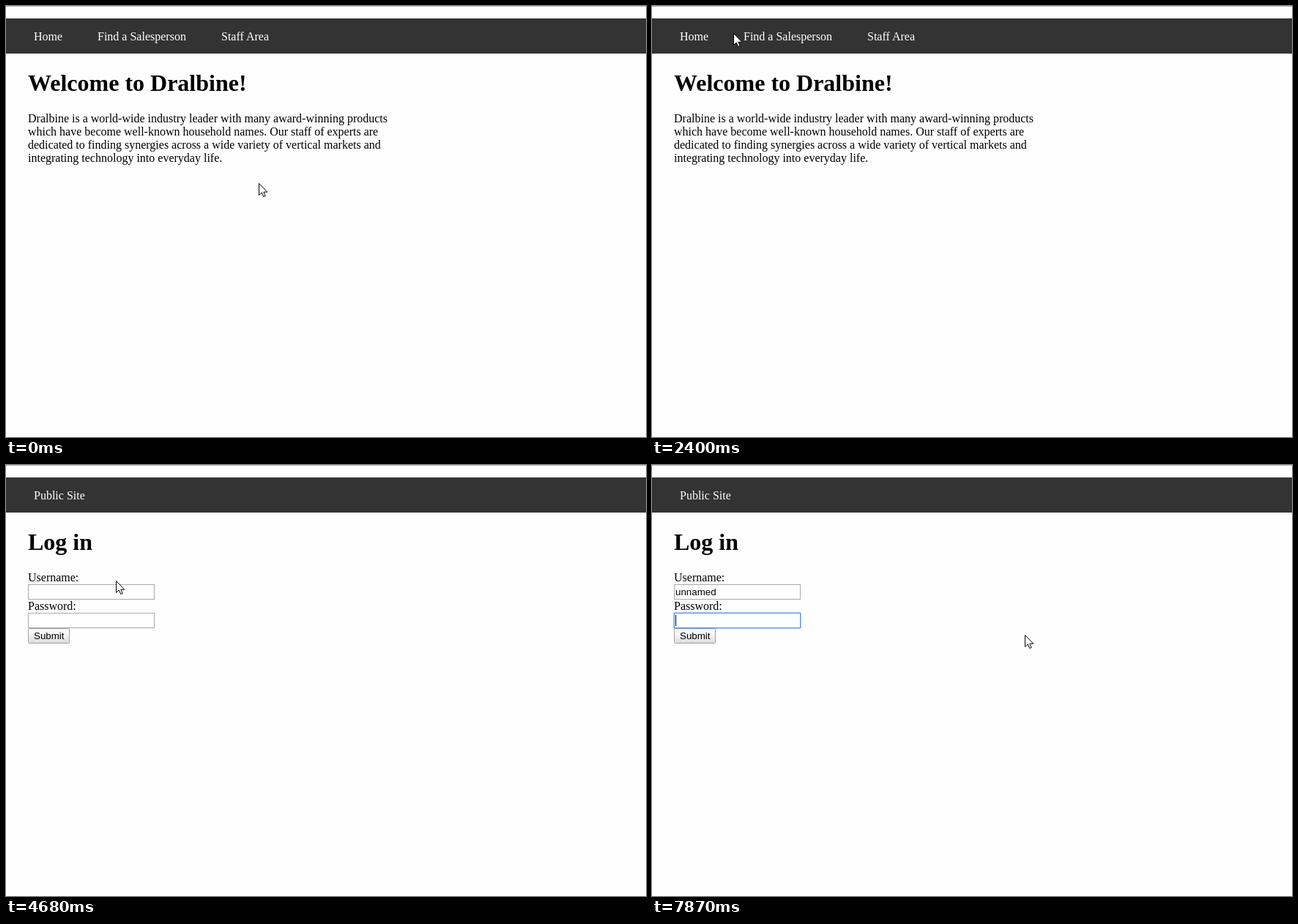
Animation, 874 px wide and 589 px high, one loop 8000 ms. Source, as an HTML page:

```html
<!DOCTYPE html>
<html lang="en">
<head>
<meta charset="utf-8">
<title>Log in</title>
<style>
  html, body { margin: 0; width: 100%; height: 100%; overflow: hidden; background: #fefefe; }
  svg { display: block; }
  text { font: 16px "Liberation Serif", "Times New Roman", serif; white-space: pre; }
  .nav text { fill: #fff; }
  .title { font-size: 32px; font-weight: bold; }
  .ui { font: 13.333px "Liberation Sans", Arial, sans-serif; }
  .field { fill: #fff; stroke: #a9a9a9; }
  .ring { fill: none; stroke: #5b92e5; }
  .ring .glow { stroke-opacity: .45; }
  .outlined { fill: #fff; stroke: #000; stroke-linejoin: round; }
</style>
</head>
<body>
<svg width="874" height="589" viewBox="0 0 874 589">
  <rect width="874" height="589" fill="#fefefe"/>
  <rect width="874" height="1" fill="#b4b4b4"/>
  <rect y="17" width="874" height="48" fill="#333"/>

  <g id="home">
    <g class="nav">
      <text x="38" y="47">Home</text>
      <text x="125" y="47">Find a Salesperson</text>
      <text x="294" y="47">Staff Area</text>
    </g>
    <text class="title" x="30" y="116">Welcome to Dralbine!</text>
    <text x="30" y="159">Dralbine is a world-wide industry leader with many award-winning products</text>
    <text x="30" y="177">which have become well-known household names. Our staff of experts are</text>
    <text x="30" y="195">dedicated to finding synergies across a wide variety of vertical markets and</text>
    <text x="30" y="213">integrating technology into everyday life.</text>
  </g>

  <g id="login">
    <g class="nav"><text x="38" y="47">Public Site</text></g>
    <text class="title" x="30" y="116">Log in</text>
    <text x="30" y="159">Username:</text>
    <rect class="field" x="30.5" y="163.5" width="172" height="20"/>
    <text x="30" y="198">Password:</text>
    <rect class="field" x="30.5" y="202.5" width="172" height="20"/>
    <linearGradient id="face" x2="0" y2="1">
      <stop offset=".35" stop-color="#f6f6f6"/>
      <stop offset="1" stop-color="#dcdcdc"/>
    </linearGradient>
    <rect x="30.5" y="223.5" width="56" height="20" rx="1" fill="url(#face)" stroke="#a0a0a0"/>
    <text class="ui" x="38" y="238">Submit</text>
    <text class="ui" id="user" x="32" y="178"></text>
    <g id="focus">
      <g class="ring">
        <rect class="glow" x="29.5" y="162.5" width="174" height="22" rx="1.5"/>
        <rect x="30.5" y="163.5" width="172" height="20"/>
      </g>
      <rect id="caret" y="166" width="1" height="15"/>
    </g>
  </g>

  <g id="cursor">
    <path id="arrow" class="outlined" d="M.5 .5V16.5L4.2 13L6.8 18.5L9.2 17.5L6.8 12.2H11.8Z"/>
    <g id="hand">
      <path class="outlined" d="M-1.5 12V2Q-1.5 .5 0 .5T1.5 2V7Q4 5.6 4.8 7.6Q7 6.6 7.6 8.6
        Q10.5 8 10.5 10.5V15Q10.5 17.5 8.5 19V21.5H-1.5V19.5Q-4 16.5-5.4 13.2Q-6 11.2-4.3 10.8Q-3 10.7-1.5 13Z"/>
      <path d="M1.5 7V10.5M4.8 8V11M7.6 9V11.5" stroke="#000" fill="none"/>
    </g>
    <path id="beam" d="M-3.5-7.5H-.5M1.5-7.5H4.5M.5-7V7.5M-3.5 7.5H-.5M1.5 7.5H4.5" stroke="#000" fill="none"/>
  </g>
</svg>
<script>
const LOOP = 8000, REFRESH = 133, BLINK = 550;
const LOGIN_AT = 3830, FOCUS_AT = 5630, TYPE_AT = 6880, TAB_AT = 7870;
const NAME = "unnamed", KEY_GAP = 118;

// Each move bends from the previous stop toward "via" and ends at "to"
const start = [345, 242];
const moves = [
  { from: 150, until: 1190, via: [235, 60], to: [308, 44] },
  { from: 1310, until: 1430, to: [312, 43] },
  { from: 1590, until: 2250, via: [338, 57], to: [305, 42] },
  { from: 2400, until: 2400, to: [111, 37] },
  { from: 2530, until: 3520, via: [-20, 41], to: [327, 50] },
  { from: LOGIN_AT, until: LOGIN_AT, to: [322, 44] },
  { from: 4140, until: 4680, via: [20, 110], to: [150, 158] },
  { from: 4960, until: 5230, to: [176, 180] },
  { from: 5780, until: 6450, via: [330, 295], to: [509, 232] }
];

const $ = id => document.getElementById(id);
const show = (id, on) => $(id).setAttribute("visibility", on ? "inherit" : "hidden");
const links = document.querySelectorAll("#home .nav text");
const fields = document.querySelectorAll(".field");

// Share of the move covered, advancing once per screen refresh
function progress({ from, until }, t) {
  if (t >= until) return 1;
  const steps = Math.round((until - from) / REFRESH);
  return (Math.floor((t - from) / (until - from) * steps + 1e-6) + 1) / (steps + 1);
}

function pointerAt(t) {
  let pos = start;
  for (const move of moves) {
    if (t < move.from) break;
    const k = progress(move, t), { via, to } = move;
    pos = pos.map((a, i) => {
      const mid = via ? via[i] : (a + to[i]) / 2;
      return Math.round((1 - k) ** 2 * a + 2 * k * (1 - k) * mid + k * k * to[i]);
    });
  }
  return pos;
}

function over(shapes, x, y) {
  return [...shapes].some(shape => {
    const b = shape.getBBox();
    return x >= b.x && x <= b.x + b.width && y >= b.y - 1 && y <= b.y + b.height + 1;
  });
}

function pointerKind(x, y, login) {
  if (login) return over(fields, x, y) ? "beam" : "arrow";
  return over(links, x, y) ? "hand" : "arrow";
}

function draw(t) {
  const login = t >= LOGIN_AT, typing = t >= TYPE_AT, tabbed = t >= TAB_AT;
  show("home", !login);
  show("login", login);

  const [x, y] = pointerAt(t);
  const kind = pointerKind(x, y, login);
  $("cursor").setAttribute("transform", `translate(${x} ${y})`);
  for (const k of ["arrow", "hand", "beam"]) show(k, k === kind);

  const user = $("user");
  user.textContent = typing ? NAME.slice(0, 1 + Math.floor((t - TYPE_AT) / KEY_GAP)) : "";
  show("focus", t >= FOCUS_AT);
  $("focus").setAttribute("transform", `translate(0 ${tabbed ? 39 : 0})`);
  const end = typing && !tabbed ? user.getComputedTextLength() : 0;
  $("caret").setAttribute("x", 32 + Math.round(end));
  show("caret", typing || Math.floor((t - FOCUS_AT) / BLINK) % 2 === 0);
}

function tick() {
  draw(performance.now() % LOOP);
  requestAnimationFrame(tick);
}
tick();
</script>
</body>
</html>
```
